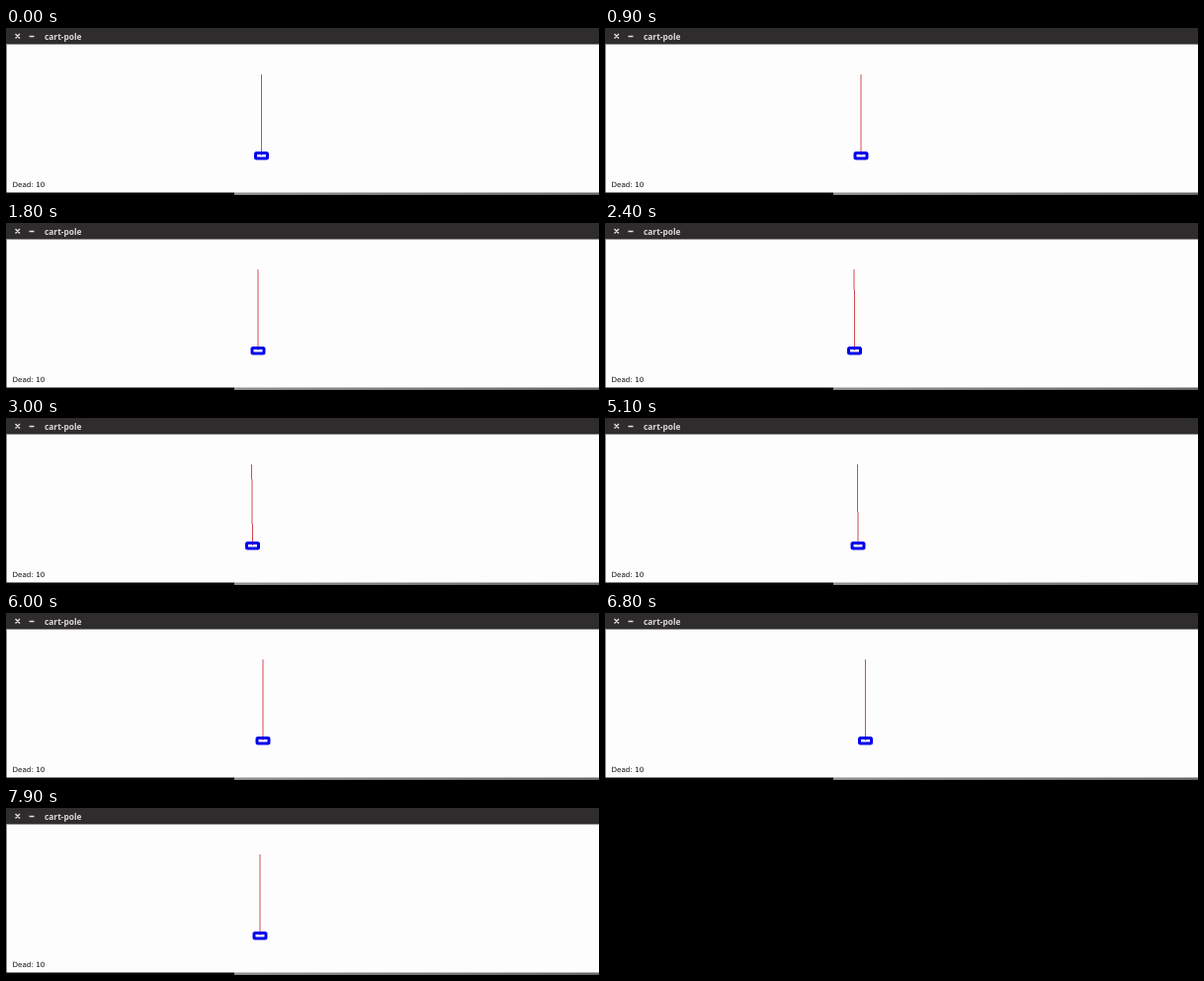
Animation, 600 px wide and 169 px high, one loop 8 s. Source, as an HTML page with a canvas:

```html
<!DOCTYPE html>
<html lang="en">
<head>
<meta charset="utf-8">
<title>cart-pole</title>
<style>
html, body { margin: 0; width: 100%; height: 100%; overflow: hidden; background: #fefdfe; }
canvas { display: block; }
</style>
</head>
<body>
<canvas id="stage" width="600" height="169"></canvas>
<script>
const ctx = document.getElementById("stage").getContext("2d");
const LOOP = 8000, STEP = 100;
const POLE_TOP = 47, POLE_BASE = 129;

// The cart drifts at a steady speed between these turns.
const turns = [
  { t: 0, x: 258.5 }, { t: 1, x: 259 }, { t: 3.3, x: 248.2 }, { t: 7.2, x: 265.5 }, { t: 8, x: 256 }
];

const halfPixel = v => Math.round(v * 2) / 2;

function cartX(t) {
  const i = turns.findIndex(turn => turn.t > t);
  const a = turns[i - 1], b = turns[i];
  return halfPixel(a.x + (b.x - a.x) * (t - a.t) / (b.t - a.t));
}

// The pole tips left once and recovers.
const poleLean = t => -1.6 * Math.exp(-(((t - 3.9) / 1.2) ** 2));

function rect(color, x, y, w, h) {
  ctx.fillStyle = color;
  ctx.fillRect(x, y, w, h);
}

function text(str, x, y, font, color) {
  ctx.font = font;
  ctx.fillStyle = color;
  ctx.fillText(str, x, y);
}

function drawWindow() {
  rect("#fefdfe", 0, 0, 600, 169);
  rect("#2f2c2e", 0, 0, 600, 16.5);
  rect("#888", 0, 16, 1, 151);
  rect("#080608", 0, 166.5, 231, 2.5);
  const strip = ctx.createLinearGradient(231, 0, 600, 0);
  strip.addColorStop(0, "#909090");
  strip.addColorStop(1, "#666");
  rect(strip, 231, 166.5, 369, 2.5);

  ctx.strokeStyle = "#e4e0dc";
  ctx.lineWidth = 1.4;
  ctx.beginPath();
  ctx.moveTo(9.5, 6); ctx.lineTo(14, 10.5);
  ctx.moveTo(14, 6); ctx.lineTo(9.5, 10.5);
  ctx.moveTo(23.5, 8.5); ctx.lineTo(28.5, 8.5);
  ctx.stroke();

  text("cart-pole", 39, 12, 'bold 8.4px "Open Sans", sans-serif', "#dedad6");
  text("Dead: 10", 6.5, 161, '7.2px "DejaVu Sans", sans-serif', "#111");
}

function drawCartPole(t) {
  const x = cartX(t), lean = poleLean(t);

  for (let y = POLE_TOP; y < POLE_BASE; y++) {
    const offset = lean * (POLE_BASE - y) / (POLE_BASE - POLE_TOP);
    rect("#d24a50", x + halfPixel(offset) - 0.5, y, 1, 1);
  }
  ctx.strokeStyle = "#0202ec";
  ctx.lineWidth = 3;
  ctx.beginPath();
  ctx.roundRect(x - 6, 126.5, 12, 5.5, 1);
  ctx.stroke();
}

function frame(now) {
  const t = Math.floor((now % LOOP) / STEP) * STEP / 1000;
  drawWindow();
  drawCartPole(t);
  requestAnimationFrame(frame);
}
requestAnimationFrame(frame);
</script>
</body>
</html>
```
